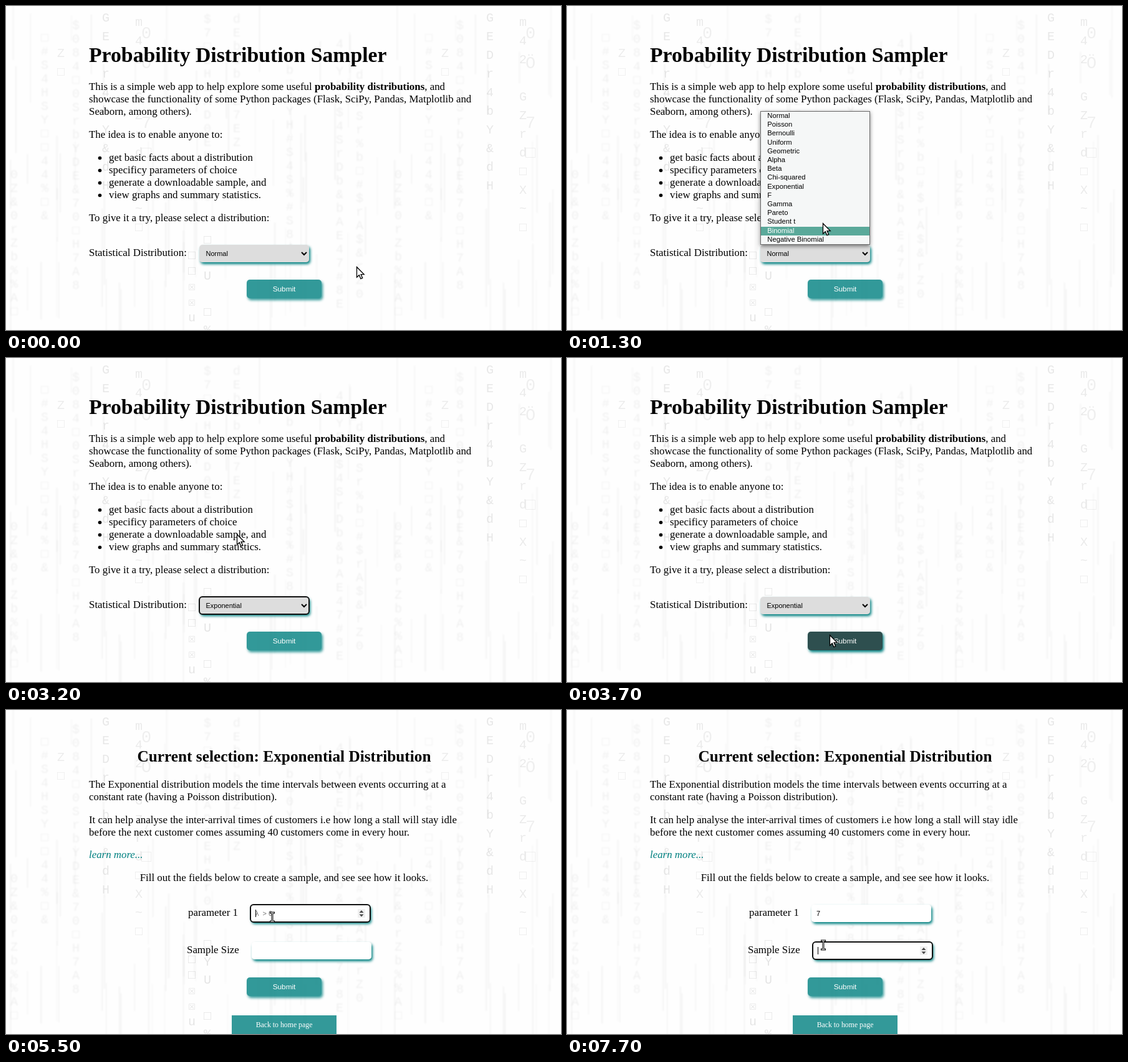
Recreate the animation shown at these times as an HTML page. Size 890x521 px, loop 8 s.

```html
<!DOCTYPE html>
<html lang="en">
<head>
<meta charset="utf-8">
<title>Probability Distribution Sampler</title>
<style>
html, body { margin: 0; width: 100%; height: 100%; overflow: hidden; background: #fefefe; }
svg { display: block; width: 890px; height: 521px; }
text { white-space: pre; }
.serif { font: 16.875px "Liberation Serif", "Times New Roman", serif; }
.sans { font: 10.97px "Liberation Sans", Arial, sans-serif; }
.popup { font: 11.25px "Liberation Sans", Arial, sans-serif; }
.rain { font: 20px "Liberation Mono", "DejaVu Sans Mono", monospace; text-anchor: middle; }
.mid { text-anchor: middle; }
</style>
</head>
<body>
<svg id="stage" viewBox="0 0 890 521" xmlns="http://www.w3.org/2000/svg">
  <defs>
    <filter id="glow" x="-20%" y="-60%" width="140%" height="220%">
      <feDropShadow dx="2" dy="3" stdDeviation="2.3" flood-color="#008080"/>
    </filter>
    <filter id="shade" x="-10%" y="-10%" width="120%" height="120%">
      <feDropShadow dx="0" dy="2" stdDeviation="3" flood-color="#000" flood-opacity=".5"/>
    </filter>
    <filter id="blur"><feGaussianBlur stdDeviation="1.3"/></filter>
  </defs>

  <g id="rain"></g>

  <g id="home" class="serif">
    <g id="intro"></g>
    <text x="133" y="90" font-size="33.75" font-weight="bold">Probability Distribution Sampler</text>
    <text x="133" y="135">This is a simple web app to help explore some useful <tspan font-weight="bold">probability distributions</tspan>, and</text>
    <rect x="310" y="384" width="176" height="28" rx="5" fill="#ddd" filter="url(#glow)"/>
    <rect id="selRing" x="310" y="384" width="176" height="28" rx="5" fill="none" stroke="#101010" stroke-width="2"/>
    <text id="selText" class="sans" x="320.5" y="402"></text>
    <path d="M474 396l4 4 4-4" fill="none" stroke="#000" stroke-width="2"/>
  </g>

  <g id="detail" class="serif">
    <g id="about"></g>
    <text class="mid" x="446" y="83" font-size="25.3125" font-weight="bold">Current selection: Exponential Distribution</text>
    <text x="133" y="238" font-style="italic" fill="#008080">learn more...</text>
    <text class="mid" x="446" y="275">Fill out the fields below to create a sample, and see see how it looks.</text>
    <g id="fields"></g>
    <rect x="362" y="491" width="168" height="30" fill="#008080" opacity=".8"/>
    <text class="mid" x="446" y="510" font-size="11.81" fill="#fff">Back to home page</text>
  </g>

  <g id="submit">
    <rect id="button" x="386" y="440" width="120" height="30" rx="5" filter="url(#glow)"/>
    <text class="sans mid" x="446" y="459" style="font-size:11.81px" fill="#fff">Submit</text>
  </g>

  <g id="popup" class="popup">
    <rect x="310.5" y="169.5" width="175" height="214" fill="#f5f7f7" stroke="#6b6b6b" filter="url(#shade)"/>
    <rect id="mark" x="311" width="174" fill="#5aa99a"/>
  </g>

  <g id="arrow">
    <path d="M.5 .7V17.2L4.3 13.7 6.9 19.6 9.7 18.4 7.1 12.6H12.2Z" fill="#fff" stroke="#000" stroke-width="1.3"/>
  </g>
  <g id="beam" fill="none">
    <path d="M-4 -7H4M0 -7V7M-4 7H4" stroke="#000" stroke-width="3"/>
    <path d="M-3 -7H3M0 -7V7M-3 7H3" stroke="#fff"/>
  </g>
</svg>

<script>
const NS = "http://www.w3.org/2000/svg";
const LOOP = 8000;
const $ = id => document.getElementById(id);

function add(parent, tag, attrs, text) {
  const el = document.createElementNS(NS, tag);
  for (const k in attrs) el.setAttribute(k, attrs[k]);
  if (text !== undefined) el.textContent = text;
  parent.appendChild(el);
  return el;
}
const show = (el, on) => el.setAttribute("visibility", on ? "visible" : "hidden");

// Faint code rain: one 616px tile, repeated sideways
let seed = 11;
function rand() {
  seed = (seed * 16807) % 2147483647;
  return seed / 2147483647;
}
const GLYPHS = "0Y#8□A&SZ%b4Dd□$Hr7E";

function column(g, x, y, text, pitch, alpha, size = 20) {
  [...text].forEach((c, i) => {
    for (const dx of [0, 616])
      add(g, "text", { x: x + dx, y: y + i * pitch + 7, "fill-opacity": alpha, style: `font-size:${size}px` }, c);
  });
}

function buildRain() {
  const sharp = add($("rain"), "g", { class: "rain" });
  column(sharp, 160, 18, "GEDr4bY&dH", 30, .09);
  column(sharp, 213, 25, "m42 GZrd□X~□", 30, .08);
  column(sharp, 225, 45, "0Ö 7□", 48, .06, 27);
  column(sharp, 88, 75, "Z□", 30, .07);
  column(sharp, 298, 400, "□□☒☒u", 25, .1);
  column(sharp, 323, 375, "□YU □%", 29, .1);

  const soft = add($("rain"), "g", { class: "rain", filter: "url(#blur)" });
  for (const [x, top, end] of [[13, 270, 520], [62, 50, 360], [112, 30, 490], [323, 20, 340],
    [370, 20, 260], [455, 80, 420], [535, 60, 500], [567, 110, 500]]) {
    const n = Math.floor((end - top) / 22);
    const text = Array.from({ length: n }, () => GLYPHS[Math.floor(rand() * GLYPHS.length)]).join("");
    column(soft, x, top, text, 22, .06);
  }
  for (let i = 0; i < 75; i++) {
    const x = 6 + Math.floor(rand() * 25) * 24.5 + rand() * 9;
    const y = rand() * 480 - 20, h = 40 + rand() * 130, a = .02 + rand() * .03;
    for (const dx of [0, 616])
      add(soft, "rect", { x: x + dx, y, width: 2, height: h, "fill-opacity": a });
  }
}

// Page text
const lines = (id, rows) => rows.forEach(([x, y, s]) => add($(id), "text", { x, y }, s));
lines("intro", [
  [133, 155, "showcase the functionality of some Python packages (Flask, SciPy, Pandas, Matplotlib and"],
  [133, 175, "Seaborn, among others)."],
  [133, 212, "The idea is to enable anyone to:"],
  [133, 346, "To give it a try, please select a distribution:"],
  [133, 402, "Statistical Distribution:"]
]);
["get basic facts about a distribution", "specificy parameters of choice",
  "generate a downloadable sample, and", "view graphs and summary statistics."].forEach((s, i) => {
  add($("intro"), "circle", { cx: 150.5, cy: 244.5 + i * 20, r: 2.8 });
  add($("intro"), "text", { x: 165, y: 249 + i * 20 }, s);
});
lines("about", [
  [133, 125, "The Exponential distribution models the time intervals between events occurring at a"],
  [133, 145, "constant rate (having a Poisson distribution)."],
  [133, 182, "It can help analyse the inter-arrival times of customers i.e how long a stall will stay idle"],
  [133, 202, "before the next customer comes assuming 40 customers come in every hour."],
  [292, 331, "parameter 1"],
  [290, 391, "Sample Size"]
]);

// Number inputs
function makeField(x, y) {
  const g = add($("fields"), "g", { transform: `translate(${x} ${y})`, class: "sans" });
  const box = { width: 192, height: 28, rx: 5 };
  add(g, "rect", { ...box, fill: "#fff", filter: "url(#glow)" });
  const text = add(g, "text", { x: 8, y: 18 });
  const ring = add(g, "rect", { ...box, fill: "none", stroke: "#101010", "stroke-width": 2 });
  const spin = add(g, "g", {});
  add(spin, "rect", { x: 172, y: 7, width: 12, height: 14, fill: "#f0f0f0" });
  add(spin, "path", { d: "M174.5 13l3.5-4 3.5 4zM174.5 15.5l3.5 4 3.5-4z", fill: "#484848" });
  const caret = add(g, "rect", { y: 8, width: 1, height: 12 });
  return { x, y, text, ring, spin, caret };
}
const rate = makeField(392, 313);
const size = makeField(394, 373);

function setField(f, p, focus, caretOn, caretX) {
  const over = inField(f, p);
  show(f.ring, focus);
  show(f.spin, focus || over);
  show(f.caret, focus && caretOn);
  f.caret.setAttribute("x", caretX);
}
const inField = (f, p) => p.x >= f.x && p.x < f.x + 192 && p.y >= f.y && p.y < f.y + 27;

// Drop-down options
const ROW = 14.2;
const options = ["Normal", "Poisson", "Bernoulli", "Uniform", "Geometric", "Alpha", "Beta", "Chi-squared",
  "Exponential", "F", "Gamma", "Pareto", "Student t", "Binomial", "Negative Binomial"]
  .map((s, i) => add($("popup"), "text", { x: 321.3, y: Math.round(180 + i * ROW) }, s));

// Pointer moves: first step, step count, end point, easing
const easeOut = e => k => 1 - (1 - k) ** e;
const easeIn = e => k => k ** e;
const MOVES = [
  [300, 3, 442, 400, easeOut(1.5)],
  [1200, 7, 370, 283, easeOut(1.72)],
  [3300, 3, 421, 445, easeOut(1.3)],
  [4600, 4, 423, 340, easeIn(1.27)],
  [5200, 2, 427, 333, easeOut(1)],
  [6800, 1, 427, 362, easeOut(1)],
  [6900, 2, 427, 410, easeOut(3)],
  [7200, 5, 411, 378, easeOut(1.3)]
];

function pointer(t) {
  let x = 562, y = 419;
  for (const [start, n, tx, ty, ease] of MOVES) {
    if (t < start) break;
    const k = ease(Math.min(n, Math.floor((t - start) / 100) + 1) / n);
    x += (tx - x) * k;
    y += (ty - y) * k;
  }
  return { x: Math.round(x), y: Math.round(y) };
}

function render(t) {
  const within = (a, b) => t >= a && t < b;
  const p = pointer(t);
  const onHome = t < 3900;
  $("home").style.display = onHome ? "" : "none";
  $("detail").style.display = onHome ? "none" : "";

  $("selText").textContent = t < 3200 ? "Normal" : "Exponential";
  show($("selRing"), within(3200, 3700));

  const open = within(700, 3200);
  $("popup").style.display = open ? "" : "none";
  if (open) {
    const row = t < 1200 ? 0 : Math.min(14, Math.floor((p.y + 6 - 170) / ROW));
    const top = Math.round(170 + row * ROW);
    $("mark").setAttribute("y", top);
    $("mark").setAttribute("height", Math.round(170 + (row + 1) * ROW) - top);
    options.forEach((o, i) => o.setAttribute("fill", i === row ? "#fff" : "#000"));
  }

  const hot = within(3500, 4700);
  $("submit").setAttribute("transform", `translate(0 ${onHome ? 0 : -10})`);
  $("button").setAttribute("fill", hot ? "#2f4f4f" : "#008080");
  $("button").setAttribute("opacity", hot ? 1 : .8);

  let beam = false;
  if (!onHome) {
    const typed = t >= 6400;
    rate.text.textContent = typed ? "7" : "λ  > 0";
    rate.text.setAttribute("fill", typed ? "#000" : "#757575");
    const blink = within(5500, 6100) || within(6400, 6900) || t >= 7400;
    setField(rate, p, within(5500, 7700), blink, typed ? 14 : 8);
    setField(size, p, t >= 7700, true, 8);
    beam = inField(rate, p) || inField(size, p);
  } else {
    [rate, size].forEach(f => [f.ring, f.spin, f.caret].forEach(el => show(el, false)));
  }

  show($("arrow"), !beam);
  show($("beam"), beam);
  $(beam ? "beam" : "arrow").setAttribute("transform", `translate(${p.x} ${p.y})`);
}

buildRain();
const begin = performance.now();
function tick() {
  render((performance.now() - begin) % LOOP);
  requestAnimationFrame(tick);
}
tick();
</script>
</body>
</html>
```
